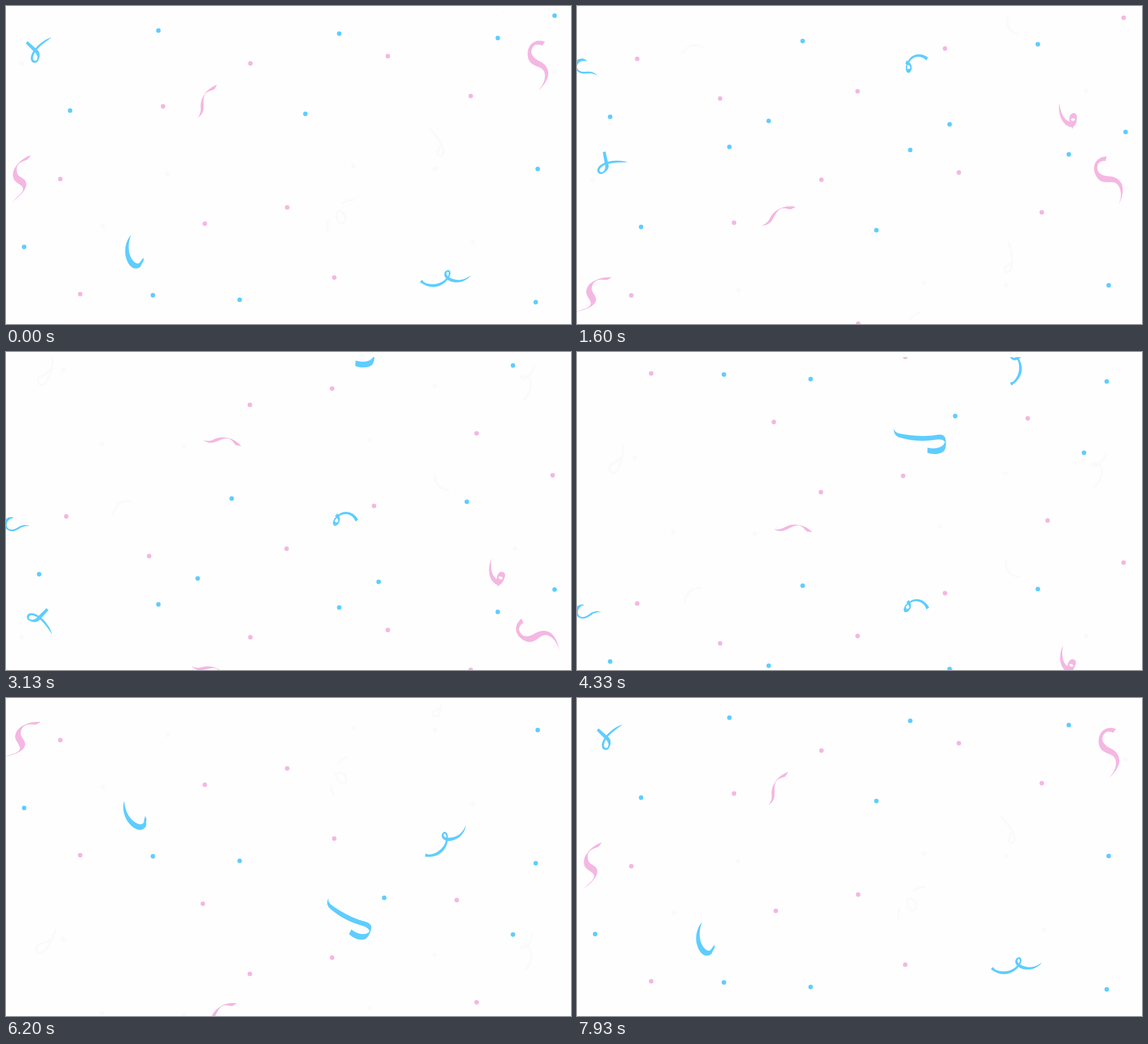
These frames come from a looping animation (998 px wide and 561 px high, 8.01 s). An HTML page with a canvas:

```html
<!DOCTYPE html>
<html lang="en">
<head>
<meta charset="utf-8">
<title>Falling confetti</title>
<style>
html, body { margin: 0; width: 100%; height: 100%; overflow: hidden; background: #fefefe; }
canvas { display: block; }
</style>
</head>
<body>
<canvas id="stage" width="998" height="561"></canvas>
<script>
const ctx = document.getElementById('stage').getContext('2d');
const BLUE = '#5fcdff', PINK = '#f4b7e2', FAINT = '#fafafa';
const TICKS = 240, SPEED = 4.2766, TOP = 9;

// x, y of each dot at the start of the loop
const dots = {
  [FAINT]: [
    [27.5, 101], [285, 296], [613.6, 283], [758, 287], [171, 388], [824.7, 417], [969, 116],
    [899, -55], [101.5, -370], [170, -239], [314, -235.6], [642, -248], [757, -342]
  ],
  [BLUE]: [
    [269.2, 43.2], [588.6, 48.8], [868.7, 56.4], [113.2, 184.4], [528.8, 190.2], [939.2, 287.4],
    [32, 425], [259.5, 510.2], [412.7, 518.2], [935.7, 522.5], [398.6, -143.6], [814, -137.8],
    [58.5, -9.9], [338.6, -2.5], [658.2, 3.4], [895.5, -378.3], [668, -443]
  ],
  [PINK]: [
    [431.7, 101.2], [674.5, 88.4], [277.4, 177], [821, 158.8], [95.9, 305.2], [496.7, 355.2],
    [351.2, 384], [579.8, 479], [131, 508.3], [106.4, -112.1], [650, -130.4], [252.8, -42],
    [495.6, -54.9], [965.5, -184.5], [576, -337.4], [430.8, -308.7], [831.2, -258.6],
    [347.6, -432.4], [796.2, -438.9]
  ]
};

const wave = 'M373 139C364 142 355 148 350 157C345 164 343 172 344 182C344 188 342 193 338 198C346 192 349 187 349 178C349 168 348 160 353 154C358 149 362 150 368 147Z';

const ribbons = [];
// px, py: pivot inside the path; x, y: pivot on stage at the start;
// angle in degrees: base + swing * cos(loop phase + shift)
function ribbon(color, px, py, y, base, swing, path, x = px, shift = 0) {
  ribbons.push({ color, px, py, x, y, base, swing, shift, path: new Path2D(path) });
}

ribbon(FAINT, 764, 245, 245, 40, -40, 'M748 216C760 230 773 245 773 258C770 268 760 266 763 256L768 246');
ribbon(FAINT, 590, 370, 370, -26, 26, 'M616 342C606 342 598 344 594 349M585 362C596 360 602 372 598 380C590 390 580 375 585 362M570 377C567 385 567 392 568 398');
ribbon(FAINT, 70, 326, -366.8, 6.4, 14, 'M85 302C82 325 72 345 64 349C54 350 52 338 60 333C67 332 76 326 78 322');
ribbon(FAINT, 922, 345, -347.8, -4, -8, 'M933 313C931 325 924 333 915 338C908 340 906 334 914 333C924 332 930 342 926 358C923 368 918 373 914 377');
ribbon(FAINT, 768, 230, -172, 9, 12, 'M758 214C756 230 764 242 783 244');
ribbon(FAINT, 205, 275, -127, 15.5, 20, 'M189 288C192 270 204 260 221 264');

ribbon(PINK, 936, 103, 103, -32.5, 32.5, 'M952 63C943 60 934 61 928 67C921 74 920 85 923 94C926 103 937 106 944 109C952 113 954 122 950 134C947 141 944 145 939 150C948 143 957 131 958 120C958 110 953 103 944 98C936 94 929 90 928 81C928 76 930 72 934 69C939 67 944 68 947 70Z');
ribbon(PINK, 29, 308, 308, 32, -32, 'M44 263C33 267 25 273 19 281C13 288 10 297 14 306C18 312 26 315 29 319C32 324 29 329 22 335L9 348C18 340 26 334 31 327C37 319 38 311 32 306C26 301 19 300 19 290C18 284 21 279 26 276C31 273 35 273 39 270Z', 29, 5);
ribbon(PINK, 361, 168.4, 168.4, 44, -44, wave);
ribbon(PINK, 361, 168.4, -236.1, 41.5, -28, wave, 383.9, 22);
ribbon(PINK, 869, 191, -14.4, 4, -13, 'M852 171C850 184 853 198 860 206C865 212 870 213 874 214L875 217L877 213C882 210 883 202 883 196C883 190 878 188 874 190C870 192 869 198 870 204C862 202 854 190 852 171ZM872 200C875 197 879 198 880 200C879 204 874 204 872 200Z');

ribbon(BLUE, 61, 76, 76, 51, -51, 'M38 62L35 66L49 80C54 84 57 89 55 94C53 98 49 97 48 94C47 90 49 85 52 80C60 70 70 63 81 55C68 59 57 68 50 77C45 84 42 91 45 97C48 102 55 101 57 96C60 90 61 83 56 78Z');
ribbon(BLUE, 234, 435.4, 435.4, -29.7, 29.7, 'M221 404C213 412 209 426 211 440C214 455 222 464 230 463C236 463 239 459 240 454C242 453 244 448 243 444C240 447 238 450 236 453C231 457 224 451 220 442C215 430 216 416 221 404Z');
ribbon(BLUE, 780, 482, 482, -35.2, 35.2, 'M735 483L731 487C744 497 758 498 769 492C775 489 780 484 784 476C787 470 784 465 780 466C775 467 772 473 776 479C782 488 797 489 806 486C813 483 818 480 821 475C811 483 800 485 791 482C784 480 778 476 778 472C779 468 782 468 782 471C783 475 778 480 774 484C763 492 749 493 738 487Z');
ribbon(BLUE, 614.4, 284.2, -408.6, 9.9, 21.7, 'M563 261C561 269 563 275 570 279C587 288 607 294 628 295C638 295 645 297 647 302C644 310 630 313 615 306L613 315C623 321 635 322 643 317C648 312 649 304 649 296C648 288 640 287 632 287C612 286 590 280 573 273C566 270 563 267 563 261Z');
ribbon(BLUE, 602, 100, -105.4, 6.8, -22, 'M620 91C609 83 597 84 589 91C585 95 583 100 581 106C580 113 582 118 586 118C590 117 592 111 591 106C590 101 586 98 582 96L580 102C584 103 588 105 589 108C588 112 585 112 583 110C583 105 586 99 591 94C599 88 609 88 617 96Z');
ribbon(BLUE, 12, 105.4, -100, -7.6, 24.5, 'M18 98C14 92 5 91 -2 97C-6 103 -3 112 2 116C8 121 17 119 24 119C30 120 33 121 37 124C32 117 24 115 17 116C9 117 2 115 0 109C-1 101 8 94 18 98Z');

const rad = deg => deg * Math.PI / 180;

// Falls with time and re-enters above the stage
function fall(y, tick) {
  const now = y + SPEED * tick;
  return now > 700 ? now - SPEED * TICKS : now;
}

function drawDot(x, y, color) {
  ctx.fillStyle = color;
  ctx.beginPath();
  ctx.arc(x, y, 4, 0, 2 * Math.PI);
  ctx.fill();
}

function drawRibbon(r, tick) {
  ctx.save();
  ctx.translate(r.x, fall(r.y, tick));
  ctx.rotate(rad(r.base + r.swing * Math.cos(rad(360 * tick / TICKS + r.shift))));
  ctx.translate(-r.px, -r.py);
  if (r.color === FAINT) {
    ctx.strokeStyle = FAINT;
    ctx.lineWidth = 3.5;
    ctx.stroke(r.path);
  } else {
    ctx.fillStyle = r.color;
    ctx.fill(r.path);
  }
  ctx.restore();
}

// Steps alternate between 30 ms and 70 ms; the last one lasts 80 ms
function tickAt(ms) {
  const t = ms % 8010;
  return Math.min(3 * Math.floor(t / 100) + (t % 100 >= 30 ? 1 : 0), 238);
}

function draw() {
  const tick = tickAt(performance.now());
  ctx.fillStyle = '#fefefe';
  ctx.fillRect(0, 0, 998, 561);
  ctx.save();
  ctx.beginPath();
  ctx.rect(0, TOP, 998, 561 - TOP);
  ctx.clip();
  for (const color in dots)
    for (const [x, y] of dots[color]) drawDot(x, fall(y, tick), color);
  drawDot(969, 17 + SPEED * tick, BLUE); // appears only when the loop restarts
  for (const r of ribbons) drawRibbon(r, tick);
  ctx.restore();
  requestAnimationFrame(draw);
}
draw();
</script>
</body>
</html>
```
